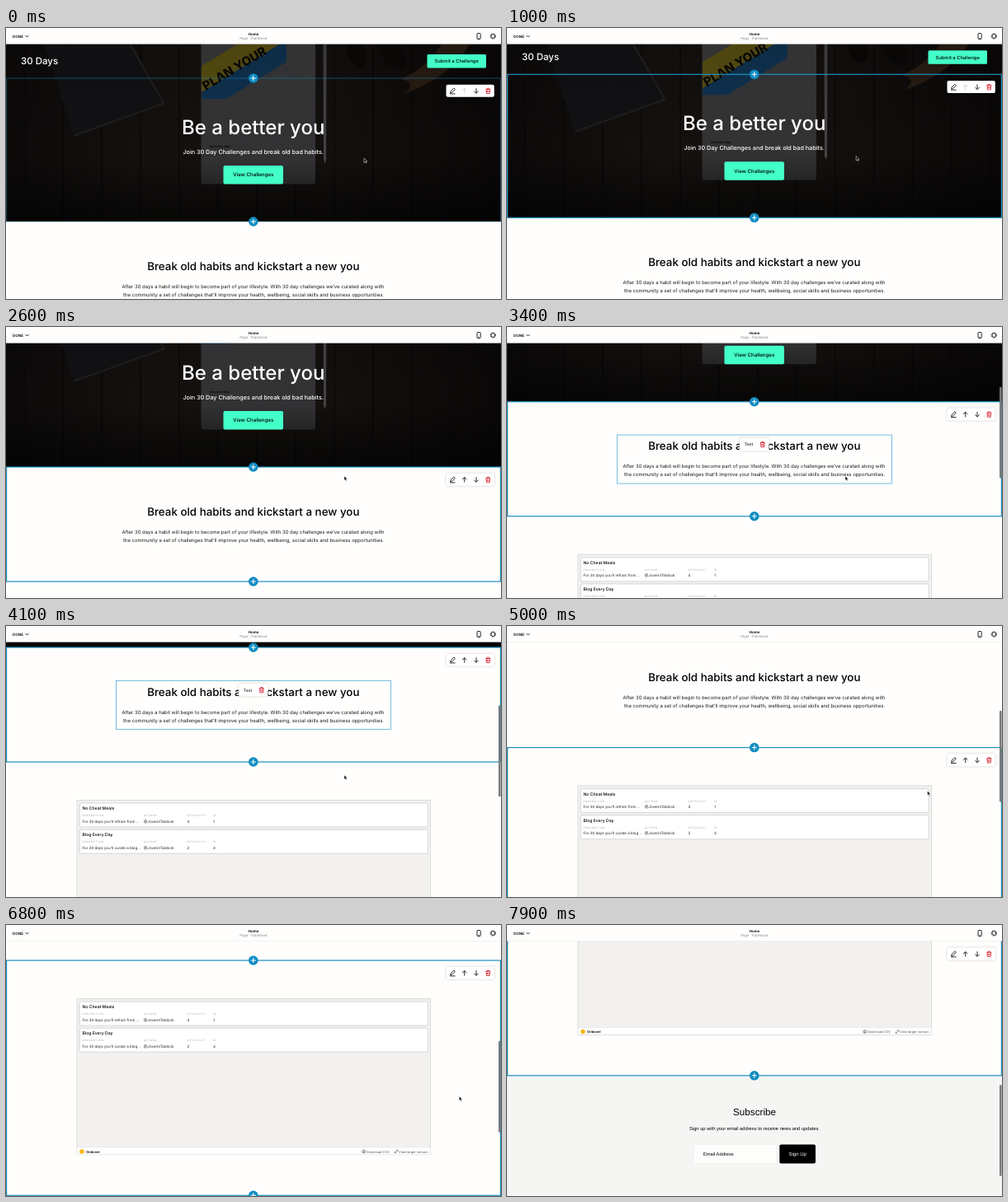
An HTML page for the animation above (8000 ms loop, 600 by 329 pixels).

```html
<!DOCTYPE html>
<html lang="en">
<head>
<meta charset="utf-8">
<title>Page editor</title>
<style>
  html, body { margin: 0; width: 100%; height: 100%; overflow: hidden; background: #fffefc; }
  svg { display: block; width: 600px; height: 329px; font-family: Inter, sans-serif; text-rendering: geometricPrecision; }
  .mid { text-anchor: middle; }
  .medium { font-weight: 500; }
  .body { font-size: 5.96px; fill: #1a1a1a; }
  .label { font-size: 3px; letter-spacing: .55px; fill: #999; }
  .cell { font-size: 4.5px; fill: #222; }
  .foot { font-size: 3.92px; fill: #555; }
  .form { font-family: "Liberation Sans", Arial, sans-serif; }
  .line { fill: none; stroke: #111; stroke-width: .9; }
  .red { stroke: #d8202f; }
  .panel { fill: #fff; filter: drop-shadow(0 .5px 1.5px rgba(0, 0, 0, .2)); }
</style>
</head>
<body>
<svg viewBox="0 0 600 329">
  <defs>
    <linearGradient id="wood">
      <stop offset="0" stop-color="#0c0a09"/><stop offset=".3" stop-color="#14110f"/>
      <stop offset=".65" stop-color="#13100e"/><stop offset="1" stop-color="#0a0807"/>
    </linearGradient>
    <linearGradient id="shade" x2="0" y2="1">
      <stop offset="0" stop-color="#000" stop-opacity=".15"/><stop offset=".65" stop-color="#000" stop-opacity="0"/>
      <stop offset="1" stop-color="#000" stop-opacity=".6"/>
    </linearGradient>
    <linearGradient id="paper" x2="0" y2="1">
      <stop offset="0" stop-color="#3c3c3e"/><stop offset="1" stop-color="#303032"/>
    </linearGradient>
    <clipPath id="sheet"><path d="M237 20H375V189H237z"/></clipPath>
    <g id="plus">
      <circle r="5.8" fill="#118cc2"/>
      <path d="M-3 0H3M0-3V3" stroke="#fff" stroke-width="1.1"/>
    </g>
    <path id="bin" class="line red" d="M-3-2.1H3M-1-2.1V-3.2H1V-2.1M-2.2-2L-1.9 3.1H1.9L2.2-2M-.7-.5V1.6M.7-.5V1.6"/>
    <path id="arrow" class="line" d="M0 3.2V-2.8M-2.6-.3L0-2.9 2.6-.3"/>
  </defs>

  <rect width="600" height="329" fill="#fffefc"/>

  <g id="page">
    <rect y="19" width="600" height="216" fill="url(#wood)"/>
    <g id="grain" stroke="#060505"></g>
    <path d="M46 20H150L191 92 82 130z" fill="#121215"/>
    <path d="M149 20H152L193 92 82 132V130L190 91z" fill="#211f1f"/>
    <g fill="#0b0908">
      <ellipse cx="425" cy="30" rx="11" ry="18" transform="rotate(-20 425 30)"/>
      <ellipse cx="468" cy="30" rx="13" ry="24" transform="rotate(-35 468 30)"/>
    </g>
    <path d="M478 62Q508 50 528 20H562Q538 60 482 80Q500 66 478 62z" fill="#281d13"/>
    <path d="M384.500 20H388.500L388 160 386.500 165 385 160z" fill="#434244"/>
    <rect x="236.500" y="10" width="138.500" height="179.500" rx="3" fill="url(#paper)"/>
    <g clip-path="url(#sheet)">
      <path d="M237 46L280 20H331L237 78z" fill="#5a5012"/>
      <path d="M237 78L331 20H340V41L267 86H237z" fill="#0f3352"/>
      <text transform="translate(242 76) rotate(-31)" font-size="15" font-weight="800" fill="#080808">PLAN YOUR</text>
      <text x="247" y="144.500" font-size="2.9" font-weight="800" fill="#080808">MY 30 DAY GOAL</text>
      <path d="M247 149H310M247 153H296M340 117H363M340 121H358" stroke="#262626" stroke-width=".6"/>
    </g>
    <rect y="19" width="600" height="216" fill="url(#shade)"/>

    <text x="18" y="44.200" font-size="11.5" class="medium" fill="#fff">30 Days</text>
    <rect x="510.500" y="32" width="71.500" height="16.500" rx="1.500" fill="#43ffc8"/>
    <text x="546.200" y="42.300" font-size="5.75" class="mid medium">Submit a Challenge</text>
    <text x="299.700" y="128.600" font-size="24" class="mid medium" fill="#fff">Be a better you</text>
    <text x="299.700" y="152.500" font-size="7.22" class="mid medium" fill="#fff">Join 30 Day Challenges and break old bad habits.</text>
    <rect x="263.500" y="167" width="72.500" height="22.500" rx="2" fill="#43ffc8"/>
    <text x="299.800" y="180.400" font-size="6.15" class="mid medium">View Challenges</text>

    <text x="299.800" y="293.500" font-size="13.36" class="mid medium">Break old habits and kickstart a new you</text>
    <text x="299.500" y="315.700" class="mid body">After 30 days a habit will begin to become part of your lifestyle. With 30 day challenges we’ve curated along with</text>
    <text x="300" y="325.700" class="mid body">the community a set of challenges that’ll improve your health, wellbeing, social skills and business opportunities.</text>

    <rect x="86" y="420.300" width="428.700" height="189.500" fill="#f2f1f0" stroke="#d0d0d0" stroke-width=".7"/>
    <g id="rows"></g>
    <path d="M86.400 601H514.300V609.400H86.400z" fill="#fff"/>
    <path d="M86 601H515" stroke="#ddd" stroke-width=".5"/>
    <circle cx="92" cy="606" r="2.800" fill="#f9b516"/>
    <text x="97" y="607.600" font-size="4.1" font-weight="600">Gridovel</text>
    <g class="line" style="stroke:#555;stroke-width:.6">
      <circle cx="433.700" cy="606" r="2"/>
      <path d="M433.700 604.600V607.200M432.700 606.200L433.700 607.200 434.700 606.200"/>
      <path d="M471.200 607.800L474.800 604.200M473 604.200H474.800V606M471.200 606V607.800H473"/>
    </g>
    <text x="437" y="607.500" class="foot">Download CSV</text>
    <text x="476" y="607.500" class="foot">View larger version</text>

    <rect y="659.500" width="600" height="240" fill="#f5f5f4"/>
    <g class="form">
      <text x="300" y="707" font-size="11.7" class="mid">Subscribe</text>
      <text x="300" y="725.800" font-size="5.75" class="mid">Sign up with your email address to receive news and updates.</text>
      <rect x="226.300" y="743" width="100" height="23" rx="1.500" fill="#fdfdfc" stroke="#e8e8e8" stroke-width=".5"/>
      <text x="238" y="756.600" font-size="5.74">Email Address</text>
      <rect x="330.300" y="743" width="43.700" height="23" rx="2"/>
      <text x="352.200" y="756.700" font-size="6.05" class="mid" fill="#fff">Sign Up</text>
    </g>
  </g>

  <g id="outline">
    <rect id="frame" x=".6" width="598.800" fill="none" stroke="#1c8fc0" stroke-width="1.200"/>
    <use id="plusTop" href="#plus"/>
    <use id="plusEnd" href="#plus"/>
  </g>
  <g id="block">
    <rect id="blockBox" fill="none" stroke="#39a0d0" stroke-width=".7"/>
    <g id="badge">
      <rect x="282" width="35.500" height="15.500" rx="2" class="panel"/>
      <text x="288" y="9.600" font-size="5">Text</text>
      <use href="#bin" x="309.800" y="7.800"/>
    </g>
  </g>
  <g id="tools">
    <rect x="533.500" y="-7.700" width="58.300" height="15" rx="2" class="panel"/>
    <path class="line" d="M538.600 2.300L539.100 .3 542.800-3.400 544.300-1.900 540.600 1.800zM538 3.500H544.500"/>
    <use id="up" href="#arrow" x="555.700"/>
    <use href="#arrow" transform="translate(570 0) scale(1 -1)"/>
    <use href="#bin" x="584.300"/>
  </g>

  <rect id="thumb" x="597" width="2.600" height="111" rx="1.300" fill="#7b7b79"/>

  <g>
    <rect width="600" height="19.600" fill="#fffefc" style="filter:drop-shadow(0 .4px .7px rgba(0,0,0,.2))"/>
    <text x="8" y="11.600" font-size="4.5" font-weight="600">DONE</text>
    <path class="line" d="M23.500 9L25.500 11 27.500 9"/>
    <text x="300" y="8.600" font-size="4.4" font-weight="600" class="mid">Home</text>
    <text x="299.800" y="14.300" font-size="4.2" font-style="italic" class="mid" fill="#888">Page · Published</text>
    <rect x="571" y="6.500" width="4.200" height="7" rx=".8" class="line"/>
    <path d="M572.500 12.200H573.700" class="line"/>
    <circle cx="590.300" cy="10" r="2.400" class="line"/>
    <circle cx="590.300" cy="10" r="3.200" class="line" stroke-dasharray="1.26 1.253"/>
  </g>

  <g id="cursor">
    <path id="pointer" d="M0 0V5.300L1.300 4.200 2.200 6 3.100 5.600 2.300 3.800H3.900z" stroke="#fff" stroke-width=".5"/>
    <path id="beam" d="M-1.300-3Q0-3 0-2.200Q0-3 1.300-3M0-2.200V2.200M-1.300 3Q0 3 0 2.200Q0 3 1.300 3" fill="none" stroke="#ddd" stroke-width=".8"/>
  </g>
</svg>
<script>
const LOOP = 8000, STEP = 100;
const $ = id => document.getElementById(id);
const set = (id, attrs) => { for (const k in attrs) $(id).setAttribute(k, attrs[k]); };
const show = (id, on) => set(id, { visibility: on ? "visible" : "hidden" });
const move = (id, x, y) => set(id, { transform: `translate(${x} ${y})` });

// [time, value]
const scrollKeys = [[0, 0], [900, 0], [1500, 28.2], [2300, 63], [2600, 65], [2700, 66], [3300, 135],
  [4100, 209], [4500, 222], [5400, 230], [5600, 251.5], [5900, 266], [6000, 266], [6400, 322],
  [6700, 322], [6800, 331], [7400, 408], [7500, 408], [7900, 476.5]];
const cursorX = [[0, 434], [900, 434], [1500, 368.5], [1700, 368.5], [2400, 410], [4500, 410], [5200, 549.3]];
const cursorY = [[0, 158], [900, 158], [1500, 143.5], [1700, 143.5], [2400, 181], [4500, 181], [5200, 208]];

// Page positions of the sections and their text blocks
const sections = [
  { top: 61, end: 235, box: [187, 100.3, 226, 60], glow: .5 },
  { top: 235, end: 374, box: [133.5, 275.3, 333, 59], glow: 1 },
  { top: 374, end: 659.3 }
];

function at(keys, t) {
  const i = keys.findIndex(k => k[0] > t);
  if (i < 0) return keys[keys.length - 1][1];
  const [t0, a] = keys[i - 1], [t1, b] = keys[i];
  return a + (b - a) * (t - t0) / (t1 - t0);
}

function row(y, title, about, level, id) {
  const cells = [[92.5, "DESCRIPTION", about], [167, "AUTHOR", "@JoverinTaldock"],
    [219.5, "DIFFICULTY", level], [251, "ID", id]];
  return `<rect x="89.300" y="${y}" width="422" height="29" rx="2" fill="#fff" stroke="#c9c9c9" stroke-width=".7"/>
    <text x="92.500" y="${y + 8.2}" font-size="5.1" class="medium">${title}</text>` +
    cells.map(([x, label, value]) => `<text x="${x}" y="${y + 16.1}" class="label">${label}</text>
      <text x="${x}" y="${y + 23.6}" class="cell">${value}</text>`).join("");
}
$("rows").innerHTML = row(424, "No Cheat Meals", "For 30 days you’ll refrain from ...", 4, 1) +
  row(456.2, "Blog Every Day", "For 30 days you’ll curate a blog...", 2, 4);

let planks = "";
for (let x = 22; x < 600; x += 47) planks += `<path d="M${x} 20V235"/>`;
$("grain").innerHTML = planks;

function draw(t) {
  const y = at(scrollKeys, t);
  const hover = t < 2400 ? 0 : t < 4800 ? 1 : 2;
  const { top, end, box, glow } = sections[hover];
  move("page", 0, -y);

  set("frame", { y: top - y, height: end - top, opacity: Math.min(1, .4 + t / 400 * .6) });
  move("plusTop", 299.8, top - y);
  move("plusEnd", 299.8, end - y);

  const blockOn = t >= 1200 && t < 1800 || t >= 3000 && t < 4800;
  show("block", blockOn);
  if (blockOn) {
    const [bx, by, width, height] = box;
    set("blockBox", { x: bx, y: by - y, width, height, opacity: glow });
    move("badge", 0, by - y + 3.7);
  }

  move("tools", 0, Math.max(35.3, top - y + 15.4));
  set("up", { opacity: hover ? 1 : .2 });

  show("thumb", t >= 2800);
  set("thumb", { y: 20 + y * .365 });

  const beam = t >= 1300 && t < 1800;
  move("cursor", at(cursorX, t), at(cursorY, t));
  show("pointer", !beam && t < 7600);
  show("beam", beam);
}

const start = performance.now();
function tick() {
  const t = (performance.now() - start) % LOOP;
  draw(Math.floor(t / STEP) * STEP);
  requestAnimationFrame(tick);
}
draw(0);
requestAnimationFrame(tick);
</script>
</body>
</html>
```
